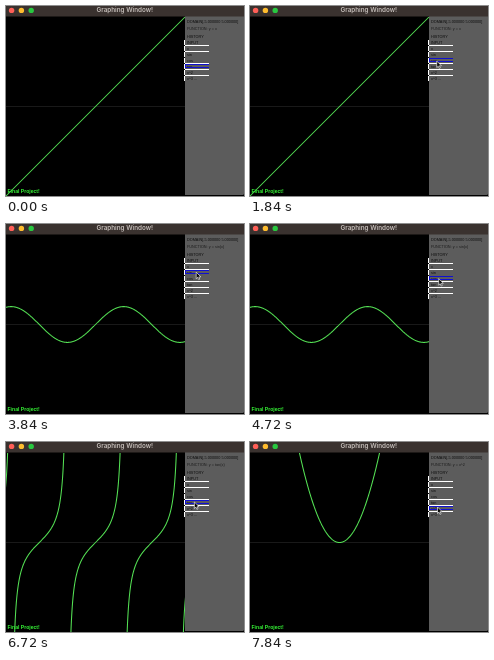
Recreate the animation shown at these times as an HTML page. Size 238 px wide and 190 px high, loop 8000 ms.

```html
<!DOCTYPE html>
<html lang="en">
<head>
<meta charset="utf-8">
<title>Graphing Window!</title>
<style>
  html, body { margin: 0; width: 100%; height: 100%; overflow: hidden; background: #000; }
  svg { display: block; width: 238px; height: 190px; }
  text { font-family: "Liberation Sans", sans-serif; }
  .title { font: 600 6.3px Inter, sans-serif; fill: #c4bdb9; }
  .small { font-size: 3.8px; fill: #0c0c0c; }
  .credit { font-size: 5.1px; font-weight: bold; fill: #35f435; }
  .crisp { shape-rendering: crispEdges; fill: none; }
</style>
</head>
<body>
<svg viewBox="0 0 238 190">
  <defs><clipPath id="view"><rect y="11" width="179" height="179"/></clipPath></defs>
  <rect width="238" height="190"/>
  <path d="M0 100.5H179" stroke="#202020" stroke-width=".8"/>
  <g clip-path="url(#view)">
    <path id="curve" fill="none" stroke="#54e054" stroke-width="1.05" stroke-linejoin="round"/>
  </g>
  <text class="credit" x="1.5" y="187">Final Project!</text>
  <path d="M179 10H238V187.5Q238 189 236.5 189H179Z" fill="#5c5c5c"/>
  <rect width="238" height="10.5" fill="#3a322f"/>
  <circle cx="5.6" cy="4.4" r="2.7" fill="#ff5f57"/>
  <circle cx="15.4" cy="4.4" r="2.7" fill="#febc2e"/>
  <circle cx="25.2" cy="4.4" r="2.7" fill="#28c840"/>
  <text class="title" x="118.8" y="6.2" text-anchor="middle">Graphing Window!</text>
  <text class="small" x="181" y="17.3">DOMAIN[-5.000000 5.000000]</text>
  <text class="small" x="181" y="24.3" id="formula" opacity=".8"></text>
  <text class="small" x="181" y="31.8">HISTORY</text>
  <g id="rows"></g>
  <path id="hover" class="crisp" d="M179 .5H203M179 3.5H203M179.5 0V4" stroke="#1010d0"/>
  <path id="cursor" d="M0 0V6.5L1.5 5.1L2.5 7.4L3.6 6.9L2.6 4.7H4.7Z" fill="#080808" stroke="#fff" stroke-width=".6"/>
</svg>
<script>
const LOOP = 8000, STEP = 80, UNIT = 17.9, CX = 89.5, CY = 100.5;
const ROW_TOP = 45, PITCH = 6;
const $ = id => document.getElementById(id);

const scenes = [
  { at: 0, name: 'x', f: x => x },
  { at: 3840, name: 'sin(x)', f: Math.sin },
  { at: 5120, name: 'cos(x)', f: Math.cos },
  { at: 6400, name: 'tan(x)', f: Math.tan },
  { at: 7680, name: 'x^2', f: x => x * x }
];

// time, x, y of the pointer tip
const track = [
  [320, 188, 60], [1120, 186, 65], [1280, 186, 65], [2400, 187.5, 45.2],
  [3120, 187.5, 45.2], [3520, 190.2, 48.2], [4240, 190.2, 48.2],
  [4800, 188.6, 55], [5440, 188.6, 55], [6080, 188.4, 60],
  [7280, 188.4, 60], [7440, 187.5, 65], [LOOP, 187.5, 65]
];

const rowY = i => ROW_TOP + PITCH * i;
const rowAt = y => Math.floor((y - ROW_TOP + .5) / PITCH);

function addRows() {
  ['INPUT', 'x', 'sin', 'cos', 'tan', 'x^2', 'x^3 ...'].forEach((label, n) => {
    const y = rowY(n - 2);
    $('rows').insertAdjacentHTML('beforeend',
      `<path class="crisp" d="M178.5 ${y + 1}v5" stroke="#fff"/>` +
      `<text class="small" x="181" y="${y + 4.6}">${label}</text>`);
  });
  // box edges; the one between sin and cos does not show
  [-1, 0, 2, 3, 4].forEach(i => $('rows').insertAdjacentHTML('beforeend',
    `<path class="crisp" d="M179 ${rowY(i) + .5}h24" stroke="#fff"/>`));
}

function plot(f) {
  let d = '', last = null;
  for (let px = -1; px <= 180; px += .25) {
    const y = f((px - CX) / UNIT);
    if (Math.abs(y) > 12) { last = null; continue; }
    const joined = last !== null && Math.abs(y - last) < 8;
    d += `${joined ? 'L' : 'M'}${px} ${(CY - y * UNIT).toFixed(2)}`;
    last = y;
  }
  return d;
}

function pointer(t) {
  const i = Math.max(1, track.findIndex(k => k[0] >= t));
  const [t0, x0, y0] = track[i - 1], [t1, x1, y1] = track[i];
  const p = Math.min(1, Math.max(0, (t - t0) / (t1 - t0)));
  const e = p * p * (3 - 2 * p);
  return [x0 + (x1 - x0) * e, y0 + (y1 - y0) * e];
}

let shown;
function draw(time) {
  const t = Math.floor(time % LOOP / STEP) * STEP;
  const scene = scenes.filter(s => s.at <= t).pop();
  if (scene !== shown) {
    shown = scene;
    $('curve').setAttribute('d', scene.path);
    $('formula').textContent = `FUNCTION: y = ${scene.name}`;
  }
  const [x, y] = pointer(t);
  $('cursor').setAttribute('transform', `translate(${x} ${y})`);
  $('cursor').setAttribute('visibility', t < track[0][0] ? 'hidden' : 'visible');
  $('hover').setAttribute('transform', `translate(0 ${rowY(rowAt(y)) + 1})`);
}

addRows();
scenes.forEach(s => s.path = plot(s.f));
const start = performance.now();
function tick() {
  draw(performance.now() - start);
  requestAnimationFrame(tick);
}
tick();
</script>
</body>
</html>
```
